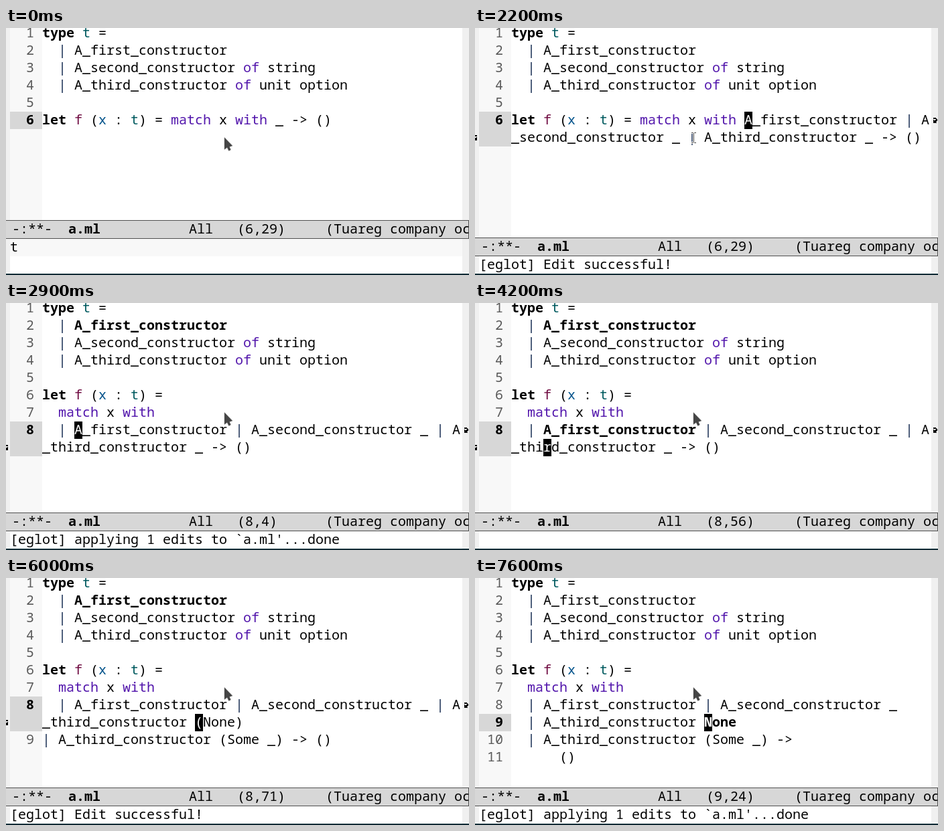
Animation, 691 px wide and 369 px high, one loop 8 s. Source, as an HTML page with a canvas:

```html
<!DOCTYPE html>
<html lang="en">
<head>
<meta charset="utf-8">
<title>Editing OCaml patterns</title>
<style>
  html, body { margin: 0; width: 100%; height: 100%; overflow: hidden; background: #fff; }
  canvas { display: block; width: 691px; height: 369px; }
</style>
</head>
<body>
<canvas id="stage" width="691" height="369"></canvas>
<script>
const ctx = document.getElementById('stage').getContext('2d');
const W = 691, H = 369, CELL = 12, ROW = 26, BASELINE = 19;
const LEFT = 6, RIGHT = 681, TEXT_X = 54, TOP = -5, BOTTOM = 367;
const FONT = '20px "Noto Sans Mono", "DejaVu Sans Mono", monospace';
const LOOP = 8000;

const RIGHT_ARROW = [0x3c, 0x3e, 0x03, 0x27, 0x3f, 0x3e, 0x3c, 0x3e];
const LEFT_ARROW = [0x3c, 0x7c, 0xc0, 0xe4, 0xfc, 0x7c, 0x3c, 0x7c];

const COLOURS = [
  [/\b(match|with|of)\b/g, '#5317ac'],
  [/(?<=^let )f/g, '#721045'],
  [/(?<=\()x(?= :)/g, '#00538b'],
  [/(?<=^type |: )t\b/g, '#005a5f'],
  [/\|/g, '#10264d'],
];

const typeDef = [
  'type t =',
  '  | A_first_constructor',
  '  | A_second_constructor of string',
  '  | A_third_constructor of unit option',
  '',
];
const oneLine = cases => [...typeDef, `let f (x : t) = match x with ${cases} -> ()`];
const multiLine = (...cases) => [...typeDef, 'let f (x : t) =', '  match x with', ...cases];
const firstTwo = '  | A_first_constructor | A_second_constructor _';

const wildcard = oneLine('_');
const expanded = oneLine('A_first_constructor | A_second_constructor _ | A_third_constructor _');
const formatted = multiLine(firstTwo + ' | A_third_constructor _ -> ()');
const split = multiLine(firstTwo + ' | A_third_constructor (None)', '| A_third_constructor (Some _) -> ()');
const tidy = multiLine(firstTwo, '  | A_third_constructor None', '  | A_third_constructor (Some _) ->', '      ()');

const edited = '[eglot] Edit successful!';
const wrote = 'Wrote /home/dev/Projects/perso/ocaml-eglot-example/lib/a.ml';
const applied = "[eglot] applying 1 edits to `a.ml'...done";

// Each step changes only the listed parts of the previous one.
const steps = [
  [0, { lines: wildcard, at: [6, 29], cursor: false, echo: 't', hint: true, symbol: 'A_first_constructor', marked: [], beam: false }],
  [400, { cursor: true }],
  [900, { cursor: false }],
  [1400, { cursor: true }],
  [1600, { echo: '', hint: false }],
  [1900, { cursor: false }],
  [2200, { lines: expanded, cursor: true, echo: edited, beam: true }],
  [2700, { marked: [2, 6], cursor: false }],
  [2800, { cursor: true, echo: wrote }],
  [2900, { lines: formatted, at: [8, 4], marked: [2], echo: applied, beam: false }],
  [3400, { marked: [2, 8], cursor: false }],
  [3900, { cursor: true }],
  [4200, { at: [8, 56], echo: '' }],
  [4400, { at: [8, 58] }],
  [4600, { at: [8, 70] }],
  [5100, { at: [8, 71] }],
  [6000, { lines: split, marked: [2], echo: edited }],
  [6500, { marked: [], echo: wrote }],
  [6600, { lines: tidy, at: [9, 24], echo: applied, symbol: 'None' }],
  [7100, { cursor: false }],
  [7200, { marked: [9] }],
  [7600, { cursor: true }],
];
let last = {};
const states = steps.map(([start, change]) => (last = { ...last, ...change, start }));

function box(x, y, w, h, colour) {
  ctx.fillStyle = colour;
  ctx.fillRect(x, y, w, h);
}

function glyph(char, x, top, colour = '#000', bold = false) {
  ctx.font = (bold ? 'bold ' : '') + FONT;
  ctx.fillStyle = colour;
  ctx.fillText(char, x, top + BASELINE);
}

function write(text, x, top, bold = false) {
  [...text].forEach((char, i) => glyph(char, x + i * CELL, top, '#000', bold));
}

function bitmap(bytes, x, y) {
  bytes.forEach((byte, row) => {
    for (let bit = 0; bit < 8; bit++) {
      if (byte & (0x80 >> bit)) box(x + bit, y + row, 1, 1, '#000');
    }
  });
}

function wrapArrows(top) {
  bitmap(RIGHT_ARROW, 682, top + 9);
  bitmap(LEFT_ARROW, -3, top + ROW + 9);
}

function styleOf(text, symbol) {
  const styles = Array.from(text, () => ({ colour: '#000', bold: false }));
  const apply = (pattern, change) => {
    for (const m of text.matchAll(pattern)) {
      for (let i = 0; i < m[0].length; i++) Object.assign(styles[m.index + i], change);
    }
  };
  for (const [pattern, colour] of COLOURS) apply(pattern, { colour });
  apply(/^(type|let)\b/g, { bold: true });
  if (symbol) apply(new RegExp(symbol, 'g'), { bold: true });
  return styles;
}

function drawBuffer(state) {
  const columns = Math.floor((RIGHT - TEXT_X) / CELL);
  let top = TOP;
  state.lines.forEach((text, index) => {
    const number = index + 1;
    const current = number === state.at[0];
    const rows = Math.max(1, Math.ceil(text.length / columns));
    if (current) box(LEFT, top, TEXT_X - LEFT, rows * ROW, '#d7d7d7');
    const label = String(number).padStart(2);
    [...label].forEach((char, i) => glyph(char, 18 + i * CELL, top, current ? '#000' : '#595959', current));

    const styles = styleOf(text, state.marked.includes(number) && state.symbol);
    [...text].forEach((char, i) => {
      const x = TEXT_X + (i % columns) * CELL;
      const y = top + Math.floor(i / columns) * ROW;
      const covered = current && state.cursor && i === state.at[1];
      if (covered) box(x, y, CELL, ROW, '#000');
      glyph(char, x, y, covered ? '#fff' : styles[i].colour, styles[i].bold);
    });
    if (rows > 1) wrapArrows(top);
    top += rows * ROW;
  });
}

function drawModeLine(top, [line, column]) {
  box(0, top, W, 28, '#505050');
  box(0, top + 1, W - 1, ROW, '#d7d7d7');
  const cell = n => 9 + n * CELL;
  write('-:**-', cell(0), top + 1);
  write('a.ml', cell(7), top + 1, true);
  write('All', cell(22), top + 1);
  write(`(${line},${column})`, cell(28), top + 1);
  write('(Tuareg company oc', cell(39), top + 1);
  box(W - 1, top, 1, 28, '#505050');
}

function drawEcho(state, top) {
  const columns = Math.floor((RIGHT - LEFT) / CELL);
  if (state.hint) box(LEFT, top, RIGHT - LEFT, ROW, '#f8f8f8');
  write(state.echo.slice(0, columns), LEFT, top);
  if (state.echo.length > columns) {
    write(state.echo.slice(columns), LEFT, top + ROW);
    wrapArrows(top);
  }
}

function drawPointer(beam) {
  const shape = new Path2D(beam
    ? 'M323 156.5h2.5l1 1l1-1h2.5M326.5 157.5v13M323 171.5h2.5l1-1l1 1h2.5'
    : 'M326 163.5V181.5L330 178.5L332.5 183.5L335.5 182L333.5 177.5L338 176Z');
  ctx.lineJoin = 'round';
  ctx.strokeStyle = beam ? '#fff' : '#e4e4e4';
  ctx.lineWidth = beam ? 3 : 1.5;
  ctx.stroke(shape);
  if (beam) {
    ctx.strokeStyle = '#444';
    ctx.lineWidth = 1;
    ctx.stroke(shape);
  } else {
    ctx.fillStyle = '#454545';
    ctx.fill(shape);
  }
}

function draw(state) {
  const echoRows = state.hint || state.echo === wrote ? 2 : 1;
  const echoTop = BOTTOM - echoRows * ROW;
  const modeTop = echoTop - 28;
  box(0, 0, W, H, '#fff');
  box(0, 0, LEFT, BOTTOM, '#f0f0f0');
  box(RIGHT, 0, W - RIGHT, BOTTOM, '#f0f0f0');
  box(LEFT, 0, TEXT_X - LEFT, modeTop, '#f8f8f8');
  drawBuffer(state);
  drawModeLine(modeTop, state.at);
  drawEcho(state, echoTop);
  box(0, BOTTOM, W, H - BOTTOM, '#082c36');
  drawPointer(state.beam);
}

const begin = performance.now();
let shown;
function tick() {
  const time = (performance.now() - begin) % LOOP;
  const state = states.findLast(s => s.start <= time);
  if (state !== shown) draw(shown = state);
  requestAnimationFrame(tick);
}
tick();
</script>
</body>
</html>
```
